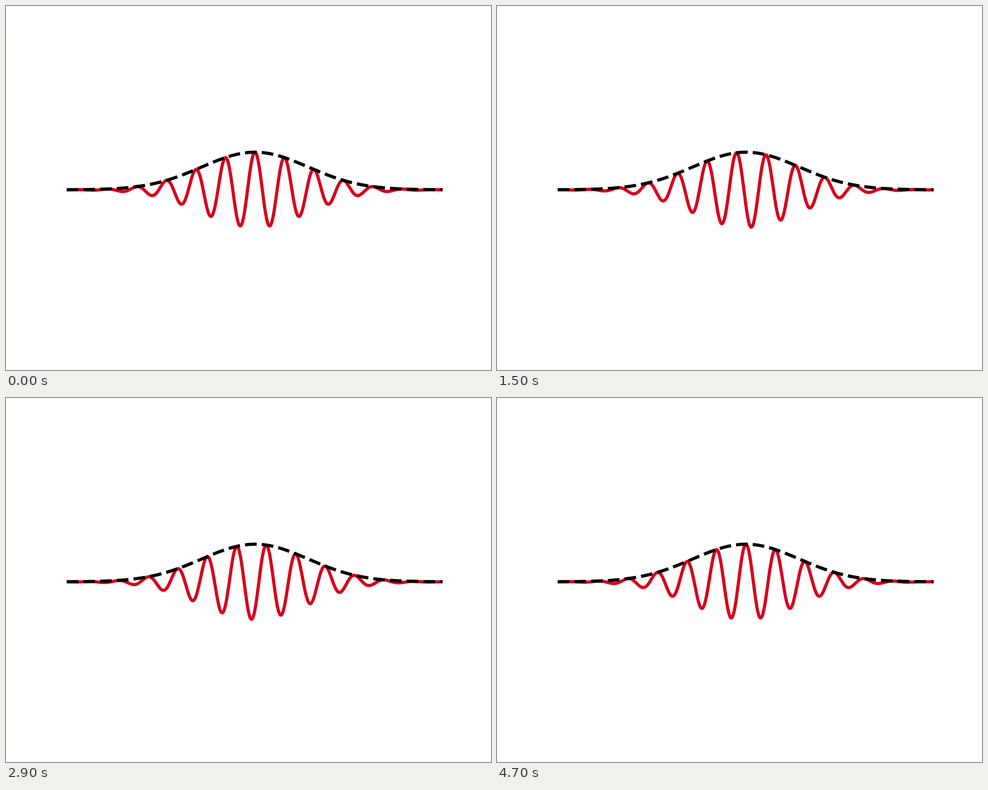
These frames come from a looping animation (864x648 px, 4800 ms). A matplotlib script:

```python
import numpy as np
import matplotlib.pyplot as plt
from matplotlib.animation import FuncAnimation

FRAMES = 48
INTERVAL = 100
K = 8            # carrier wave number
HALF_HEIGHT = 3.726

x = np.arange(-5, 5, 0.02)
envelope = np.exp(-x**2 / 4)
phases = np.linspace(0, 2 * np.pi, FRAMES)


def packet(phase):
    return envelope * np.cos(K * x + phase)


fig, ax = plt.subplots(figsize=(6.4, 4.8), dpi=135, facecolor="white")
fig.subplots_adjust(left=0.125, right=0.9, bottom=0.11, top=0.88)
ax.set_xlim(x[0], x[-1])
ax.set_ylim(-HALF_HEIGHT, HALF_HEIGHT)
ax.axis("off")

wave, = ax.plot(x, packet(0), color="#d7001b", lw=3)
ax.plot(x, envelope, color="black", lw=3, ls="--")


def update(i):
    wave.set_ydata(packet(phases[i]))
    return wave,


anim = FuncAnimation(fig, update, frames=FRAMES, interval=INTERVAL,
                     repeat=True, repeat_delay=0)
plt.show()
```
